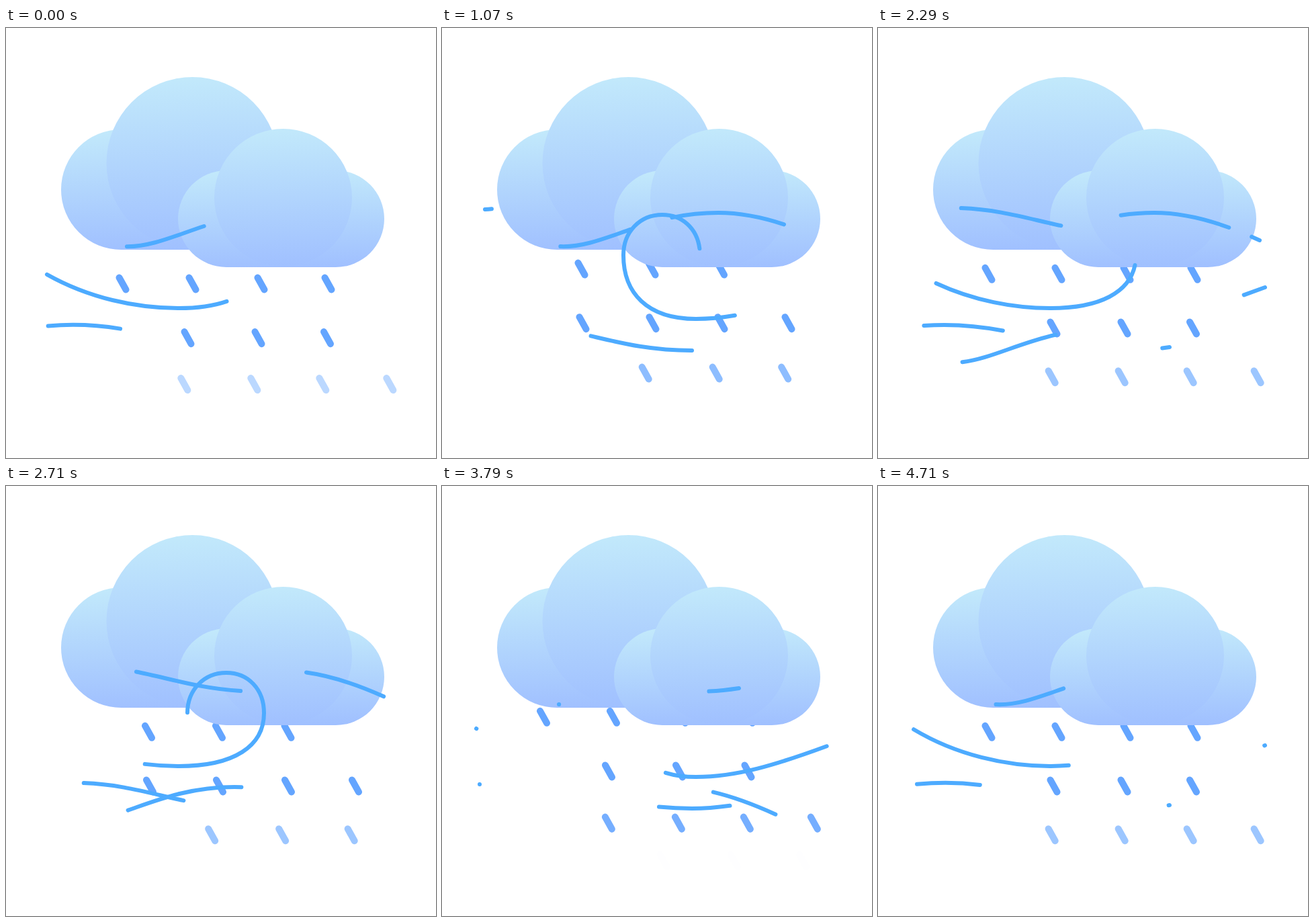
Animation, 640 px wide and 640 px high, one loop 4.78 s. Source, as an HTML page:

```html
<!DOCTYPE html>
<html lang="en">
<head>
<meta charset="utf-8">
<title>Wind and rain</title>
<style>
  html, body { margin: 0; width: 100%; height: 100%; overflow: hidden; background: #fff; }
  svg { display: block; width: 100vw; height: 100vh; }
  path { fill: none; stroke-linecap: round; }
  #rain path { stroke: #64a5ff; stroke-width: 10; }
  #wind path { stroke: #4dabff; stroke-width: 6; }
</style>
</head>
<body>
<svg viewBox="0 0 640 640">
  <defs>
    <linearGradient id="sky" x1=".48" y1="0" x2=".52" y2="1">
      <stop offset="0" stop-color="#c2e9fb"/>
      <stop offset="1" stop-color="#a0c0ff"/>
    </linearGradient>
  </defs>
  <g id="rain"></g>
  <g fill="url(#sky)">
    <rect x="82" y="151" width="298" height="179" rx="89.5"/>
    <circle cx="277.5" cy="201" r="128"/>
    <rect x="256" y="212" width="307" height="144" rx="72"/>
    <circle cx="412.5" cy="252.5" r="102.5"/>
  </g>
  <g id="wind"></g>
</svg>
<script>
const LOOP_MS = 4780, LOOP_FRAMES = 144, GUST_FRAMES = 84;

const loopPath = 'M51 361C115 400 190 417 257 417C340 417 384 387 384 338C384 302 360 278 328 278' +
  'C294 278 270 304 270 338C270 394 305 433 378 433C440 433 500 414 576 386';
const archPath = 'M174 325C240 329 300 275 411 275C470 275 524 296 568 316';
const dipPath = 'M64 270C200 257 250 306 380 306C402 306 422 304 442 301';

// lag: frames between the head and the tail of a gust
const winds = [
  { d: loopPath, dx: 0, dy: 0, lag: 25.5, starts: [114, 34] },
  { d: archPath, dx: 0, dy: 0, lag: 25, starts: [114, 4.3] },
  { d: dipPath, dx: 0, dy: 0, lag: 24, starts: [25] },
  { d: dipPath, dx: -8, dy: 174, lag: 24, starts: [114.5, 37] },
  { d: archPath, dx: -71, dy: 173, lag: 25, starts: [33] },
];

const rows = [
  { x: 173.5, offsets: [0, 104, 206, 306] },
  { x: 221, offsets: [0, 105, 207.5] },
];

function addPath(id, attributes = {}) {
  const path = document.createElementNS('http://www.w3.org/2000/svg', 'path');
  for (const name in attributes) path.setAttribute(name, attributes[name]);
  return document.getElementById(id).appendChild(path);
}

function smooth(u) {
  u = Math.min(1, Math.max(0, u));
  return u * u * (3 - 2 * u);
}

const gusts = winds.flatMap(({ d, dx, dy, lag, starts }) => starts.map(start => ({
  start, lag,
  path: addPath('wind', { d, transform: `translate(${dx} ${dy})`, pathLength: 1000 }),
})));

const rainRows = [-1, 0, 1, 2].map(index => ({ index, path: addPath('rain') }));

function drawRain(frame) {
  const cycle = Math.floor((frame - 1) / 12);
  const step = (frame - 1) % 12;
  for (const { index, path } of rainRows) {
    const age = step + 11 * index;
    const slow = Math.max(0, age - 11);
    const y = 380.5 + 7.33 * age - 0.097 * slow * slow;
    const row = rows[Math.abs(cycle + index) % 2];
    const x = row.x + 0.614 * (y - 380.5);
    path.setAttribute('d', row.offsets.map(dx => `M${x + dx - 5} ${y - 9}l10 18`).join(''));
    path.style.opacity = 1 - smooth((age - 14) / 14.7);
  }
}

function drawWind(frame) {
  for (const { start, lag, path } of gusts) {
    const age = (frame - start + LOOP_FRAMES) % LOOP_FRAMES;
    const head = 1000 * smooth(age / GUST_FRAMES);
    const tail = 1000 * smooth((age - lag) / GUST_FRAMES);
    path.style.display = head > tail ? '' : 'none';
    path.setAttribute('stroke-dasharray', `${head - tail} 3000`);
    path.setAttribute('stroke-dashoffset', -tail);
  }
}

// 30 fps motion shown in steps of 1/14 s
function draw() {
  const time = performance.now() % LOOP_MS;
  const tick = Math.floor((time + 5) * 0.014);
  const frame = Math.round(tick * 15 / 7) + 1;
  drawRain(frame);
  drawWind(frame);
  requestAnimationFrame(draw);
}
draw();
</script>
</body>
</html>
```
